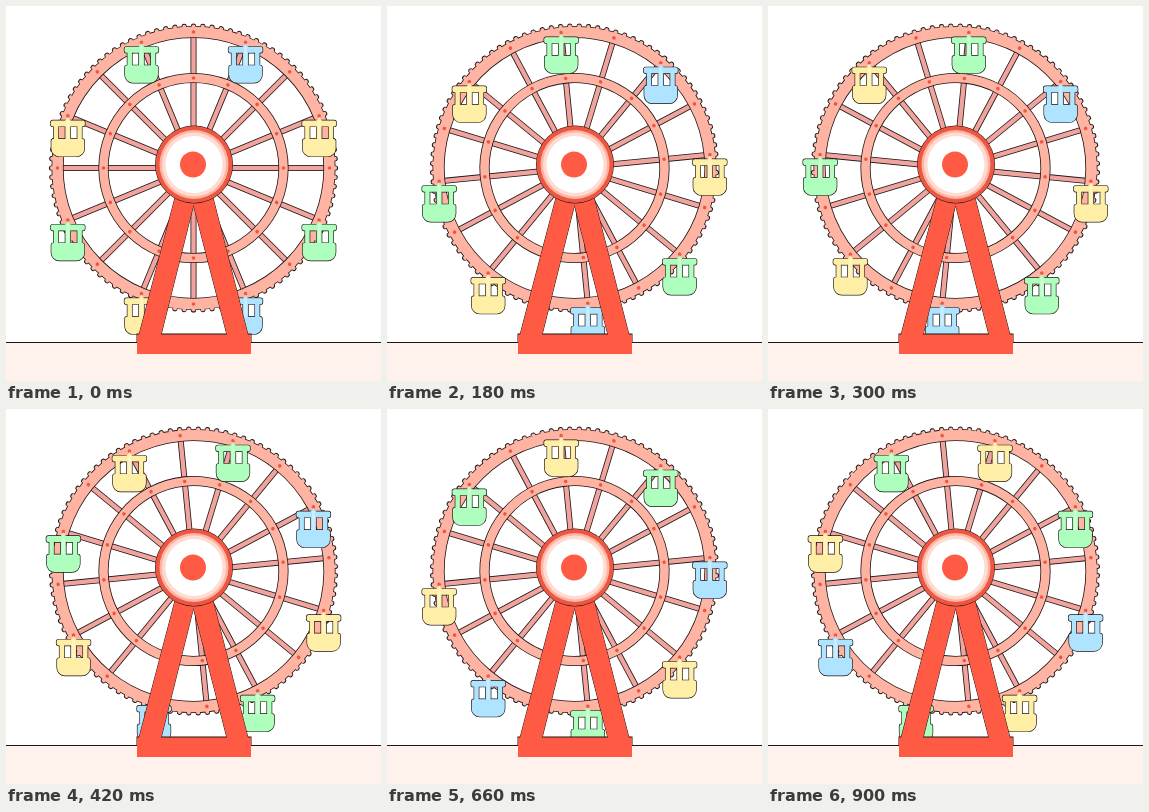
These frames come from a looping animation (375 px wide and 375 px high, 0.96 s). An HTML page with a canvas:

```html
<!DOCTYPE html>
<html lang="en">
<head>
<meta charset="utf-8">
<title>Ferris wheel</title>
<style>
html, body { margin: 0; width: 100%; height: 100%; overflow: hidden; background: #fff; }
canvas { display: block; }
</style>
</head>
<body>
<canvas id="stage" width="375" height="375"></canvas>
<script>
const ctx = document.getElementById('stage').getContext('2d');
const TAU = Math.PI * 2;
const LOOP = 960, STEP = 60, SPOKES = 16, BUMPS = 96;
const CX = 187.5, CY = 162, RIM = 136, INNER = 90;
const RED = '#ff5a43', DEEP = '#ed5742', PINK = '#ffb4a3', SPOKE = '#f0a49d', LINE = '#1c1514';
const GREEN = '#aeffbd', BLUE = '#aee4ff', YELLOW = '#ffeea5';
const cabinColors = [GREEN, BLUE, YELLOW, GREEN, BLUE, YELLOW, GREEN, YELLOW];

function disc(x, y, r, color) {
  ctx.fillStyle = color;
  ctx.beginPath();
  ctx.arc(x, y, r, 0, TAU);
  ctx.fill();
}

function ring(r, width, color) {
  ctx.strokeStyle = color;
  ctx.lineWidth = width;
  ctx.beginPath();
  ctx.arc(0, 0, r, 0, TAU);
  ctx.stroke();
}

function outlinedRing(r, width) {
  ring(r, width + 1.6, LINE);
  ring(r, width, PINK);
}

function around(count, draw) {
  for (let i = 0; i < count; i++) {
    ctx.save();
    ctx.rotate(i * TAU / count);
    draw();
    ctx.restore();
  }
}

function drawWheel(angle) {
  ctx.save();
  ctx.translate(CX, CY);
  ctx.rotate(angle);
  around(BUMPS, () => disc(0, -142, 2.6, LINE));
  around(SPOKES, () => {
    ctx.fillStyle = LINE;
    ctx.fillRect(-3, -RIM, 6, RIM);
    ctx.fillStyle = SPOKE;
    ctx.fillRect(-2.2, -RIM, 4.4, RIM);
  });
  outlinedRing(INNER, 8.6);
  outlinedRing(RIM, 10.6);
  around(BUMPS, () => disc(0, -141.6, 2, PINK));
  around(SPOKES, () => {
    disc(0, -RIM, 1.8, DEEP);
    disc(0, -INNER, 1.8, DEEP);
  });
  ctx.restore();
}

// Cabin outline hanging from (0, 0), with two see-through windows.
const cabin = new Path2D();
cabin.roundRect(-17, 4.5, 34, 6, 2);
cabin.rect(-14, 10, 4.5, 15);
cabin.rect(-2.5, 10, 5, 15);
cabin.rect(9.5, 10, 4.5, 15);
cabin.roundRect(-16.5, 23, 33, 17.5, [2, 2, 8, 8]);

function drawCabin(angle, color) {
  ctx.save();
  ctx.translate(CX + RIM * Math.sin(angle), CY - RIM * Math.cos(angle));
  ctx.strokeStyle = LINE;
  ctx.lineWidth = 1.3;
  ctx.stroke(cabin);
  ctx.fillStyle = color;
  ctx.fill(cabin);
  ctx.beginPath();
  ctx.moveTo(0, 1);
  ctx.lineTo(3, 5);
  ctx.lineTo(-3, 5);
  ctx.fill();
  ctx.fillStyle = 'rgba(255,255,255,.35)';
  ctx.fillRect(-1.5, 4, 3, 19);
  ctx.restore();
}

function drawGround() {
  ctx.fillStyle = '#fff2ed';
  ctx.fillRect(0, 337, 375, 38);
  ctx.fillStyle = LINE;
  ctx.fillRect(0, 336, 375, 1);
}

function drawStand() {
  const legs = new Path2D('M170 188H206L242 329H221L187.5 199L155 329H133Z');
  ctx.strokeStyle = LINE;
  ctx.lineWidth = 1;
  ctx.stroke(legs);
  ctx.fillStyle = LINE;
  ctx.fillRect(130.5, 327.5, 115, 9);
  ctx.fillStyle = RED;
  ctx.fill(legs);
  ctx.fillRect(131, 328.5, 114, 19.5);
  disc(188, 158.5, 39, LINE);
  disc(188, 158.5, 38.5, DEEP);
  disc(188, 158.5, 34.5, PINK);
  disc(188, 158.5, 32, '#ffdcd1');
  disc(188, 158.5, 28.5, '#fff');
  disc(187, 158.5, 13, RED);
}

function draw(time) {
  const angle = Math.floor(time % LOOP / STEP) * STEP / LOOP * TAU / 4;
  ctx.clearRect(0, 0, 375, 375);
  drawGround();
  drawWheel(angle);
  cabinColors.forEach((color, i) => drawCabin(angle + (i - 0.5) * TAU / 8, color));
  drawStand();
}

let start;
function tick(now) {
  start ??= now;
  draw(now - start);
  requestAnimationFrame(tick);
}
draw(0);
requestAnimationFrame(tick);
</script>
</body>
</html>
```
